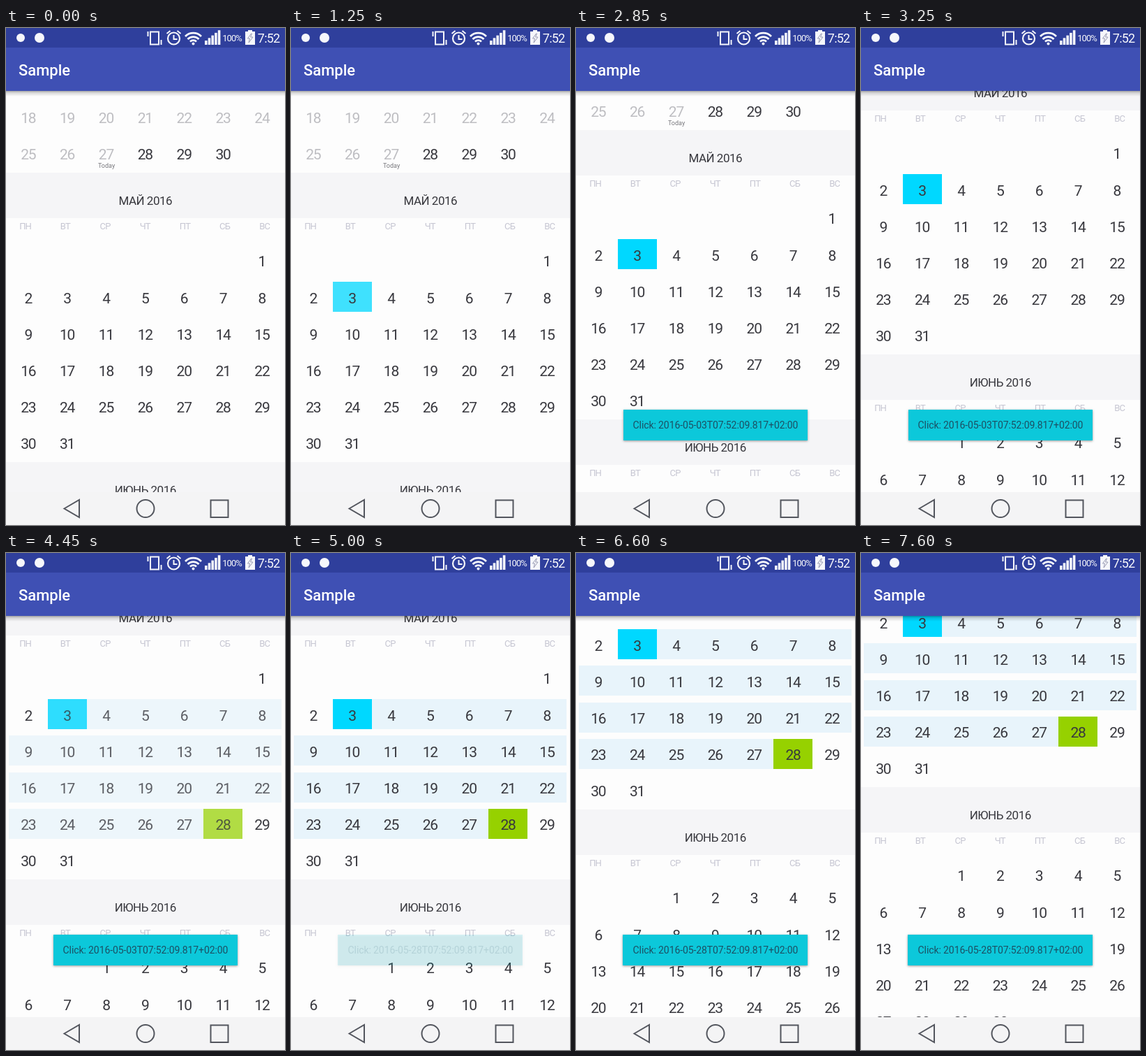
These frames come from a looping animation (400x711 px, 8000 ms). An HTML page with a canvas:

```html
<!DOCTYPE html>
<html lang="en">
<head>
<meta charset="utf-8">
<title>Calendar range picker</title>
<style>
  html, body { margin: 0; width: 100%; height: 100%; overflow: hidden; }
  canvas { display: block; }
</style>
</head>
<body>
<canvas id="stage" width="400" height="711"></canvas>
<script>
const ctx = document.getElementById('stage').getContext('2d');
const LOOP = 8000, STEP = 50;
const ROW = 52.2, COL = 55.86, LEFT = 4;
const INK = '#38383e', PAST = '#bebec2', PAPER = '#fdfdfd', BAND = '#f5f5f7';
const WEEKDAYS = ['ПН', 'ВТ', 'СР', 'ЧТ', 'ПТ', 'СБ', 'ВС'];
// top: centre of the month title before scrolling
const MONTHS = [
  { name: 'АПРЕЛЬ 2016', top: -114.8, offset: 4, days: 30, today: 27 },
  { name: 'МАЙ 2016', top: 247, offset: 6, days: 31, from: 3, to: 28 },
  { name: 'ИЮНЬ 2016', top: 661, offset: 2, days: 30 },
];

const progress = (t, start, end) => Math.min(1, Math.max(0, (t - start) / (end - start)));
const fling = p => 1 - (1 - p * p) ** 3.15;
const dip = p => 1 - p * (1 - p);

function rect(x, y, w, h, color, alpha = 1) {
  ctx.globalAlpha = alpha;
  ctx.fillStyle = color;
  ctx.fillRect(x, y, w, h);
  ctx.globalAlpha = 1;
}

// y is the vertical centre of the capitals
function text(str, x, y, size, color, { align = 'center', weight = 400, spacing = 0, alpha = 1 } = {}) {
  ctx.globalAlpha = alpha;
  ctx.font = `${weight} ${size}px Roboto, sans-serif`;
  ctx.letterSpacing = spacing + 'px';
  ctx.textAlign = align;
  ctx.fillStyle = color;
  ctx.fillText(str, x + (align === 'center' ? spacing / 2 : 0), y + size * 0.356);
  ctx.globalAlpha = 1;
}

function path(d, color, width) {
  const shape = new Path2D(d);
  if (width) {
    ctx.strokeStyle = color;
    ctx.lineWidth = width;
    ctx.stroke(shape);
  } else {
    ctx.fillStyle = color;
    ctx.fill(shape);
  }
}

function disc(x, y, r, color, width) {
  path(`M${x - r} ${y}a${r} ${r} 0 1 0 ${2 * r} 0a${r} ${r} 0 1 0 ${-2 * r} 0z`, color, width);
}

function drawSelection(month, cellAt, first, last) {
  const cells = (day, count, color, alpha) => {
    const { x, y } = cellAt(day), left = Math.round(x);
    rect(left, Math.round(y - 23), Math.round(x + count * COL) - left, 43, color, alpha);
  };
  for (let day = month.from; day < month.to;) {
    const count = Math.min(7 - (day - 1 + month.offset) % 7, month.to - day);
    cells(day, count, '#e8f4fb', last);
    day += count;
  }
  cells(month.from, 1, '#00d8ff', first * dip(last));
  cells(month.to, 1, '#96d100', last);
}

function drawMonth(month, scroll, first, last) {
  const top = month.top - scroll;
  const cellAt = day => {
    const index = day - 1 + month.offset;
    return { x: LEFT + index % 7 * COL, y: top + 87 + Math.floor(index / 7) * ROW };
  };
  rect(0, Math.round(top - 40), 400, 65, BAND);
  text(month.name, 200, top, 17, INK, { spacing: -0.5 });
  WEEKDAYS.forEach((name, i) => text(name, 28 + i * 57.2, top + 36, 13, '#c6c6d2', { spacing: -0.8 }));
  if (month.from) drawSelection(month, cellAt, first, last);
  for (let day = 1; day <= month.days; day++) {
    const { x, y } = cellAt(day), center = x + COL / 2 + 0.4;
    const changing = month.from && day >= month.from && day <= month.to;
    text(day, center, y, 21, day <= month.today ? PAST : INK,
      { spacing: -1.2, alpha: changing ? dip(last) : 1 });
    if (day === month.today) text('Today', center, y + 16, 9, '#77777c');
  }
}

function drawToast(day, alpha) {
  if (!alpha) return;
  const x = day === '03' ? 68 : 67;
  ctx.shadowColor = 'rgba(0, 0, 0, .4)';
  ctx.shadowBlur = 3;
  ctx.shadowOffsetY = 1;
  rect(x, 546, 332 - x, 44, '#0cc8da', alpha);
  ctx.shadowColor = 'transparent';
  text(`Click: 2016-05-${day}T07:52:09.817+02:00`, 200, 568, 14, '#1c5064', { spacing: -0.1, alpha });
}

function drawStatusBar() {
  const white = '#f6f7fb';
  rect(0, 0, 400, 28, '#2f3f9c');
  disc(21, 14, 6, white);
  disc(48, 14, 7, white);
  path('M207 5.5h12v18h-12zM203.5 5v7M222.5 17v7', white, 2);
  disc(240.5, 15, 8.5, white, 2.2);
  path('M240.5 10v6h5M230.5 8l5-4M250.5 8l-5-4', white, 2);
  path('M257 12a16 16 0 0 1 23 0M260.5 16a11 11 0 0 1 16 0M264 19.5a6.5 6.5 0 0 1 9 0', white, 2.8);
  disc(268.5, 22.5, 2, white);
  for (let i = 0; i < 5; i++) rect(285 + i * 4.7, 18 - i * 3.7, 3.6, 6 + i * 3.7, white);
  text('100%', 324.5, 14, 13, white, { spacing: -1 });
  path('M347 3h6v2h4v19h-14v-19h4z', white);
  path('M351.5 8l-5 7h3l-1.5 6 6-8h-3.5l2-5z', '#9a9cb4', 1);
  text('7:52', 377, 14.5, 18, white, { spacing: -0.8 });
}

function drawChrome() {
  const shadow = ctx.createLinearGradient(0, 90, 0, 98);
  shadow.addColorStop(0, 'rgba(0, 0, 0, .35)');
  shadow.addColorStop(0.35, 'rgba(0, 0, 0, .14)');
  shadow.addColorStop(1, 'rgba(0, 0, 0, 0)');
  rect(0, 90, 400, 8, shadow);
  rect(0, 28, 400, 62, '#3f50b4');
  text('Sample', 18, 60, 22, '#fff', { align: 'left', weight: 500 });
  drawStatusBar();

  const nav = '#53565e';
  rect(0, 664, 400, 47, '#f4f4f5');
  path('M83.5 687.5L105 675v25z', nav, 2);
  disc(200, 687.5, 12.5, nav, 2);
  path('M293.5 675.5h25v24.5h-25z', nav, 2);
}

function draw(now) {
  const t = Math.floor(now % LOOP / STEP) * STEP;
  const scroll = Math.round(154 * fling(progress(t, 2600, 3250)) + 132 * fling(progress(t, 6300, 6800)));
  const first = progress(t, 950, 1350), last = progress(t, 4100, 4580);
  rect(0, 0, 400, 711, PAPER);
  MONTHS.forEach(month => drawMonth(month, scroll, first, last));
  drawToast('03', progress(t, 1300, 1700) * (1 - progress(t, 4600, 4950)));
  drawToast('28', progress(t, 4950, 5300));
  drawChrome();
}

const begin = performance.now();
(function frame() {
  draw(performance.now() - begin);
  requestAnimationFrame(frame);
})();
</script>
</body>
</html>
```
